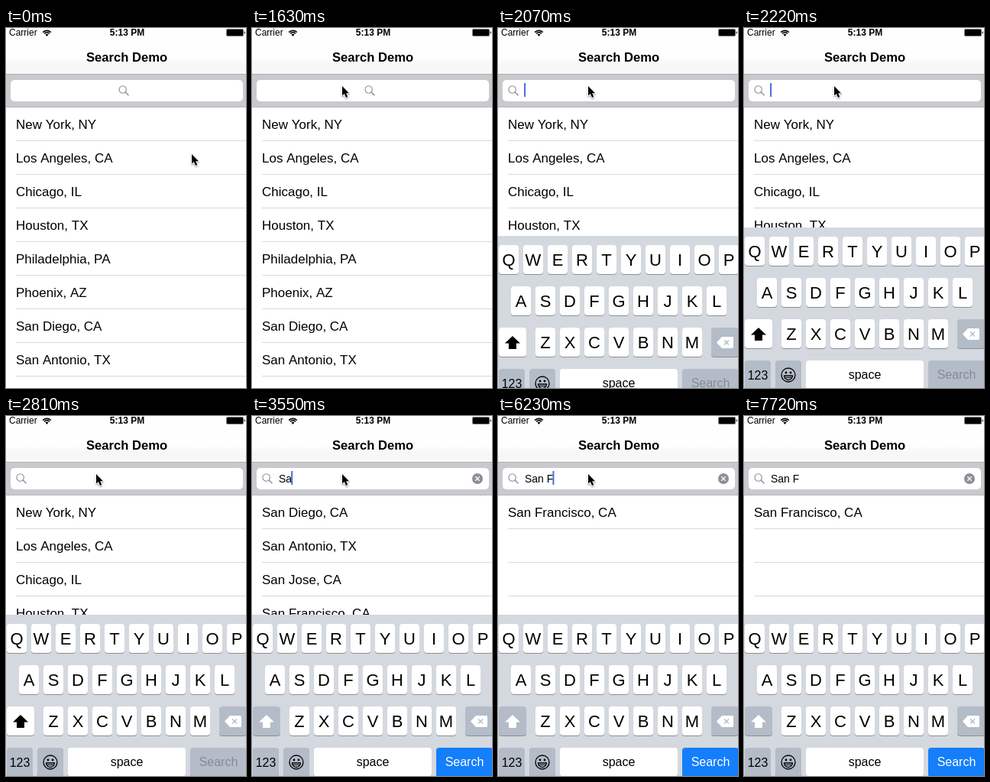
Animation, 314 px wide and 471 px high, one loop 8020 ms. Source, as an HTML page with a canvas:

```html
<!DOCTYPE html>
<html lang="en">
<head>
<meta charset="utf-8">
<title>Search Demo</title>
<style>
  html, body { margin: 0; width: 100%; height: 100%; overflow: hidden; background: #fff; }
  canvas { display: block; }
</style>
</head>
<body>
<canvas id="stage" width="314" height="471"></canvas>
<script>
const ctx = document.getElementById('stage').getContext('2d');
const W = 314, H = 471, LOOP = 8020;
const SANS = '"Liberation Sans", Arial, sans-serif';
const KEY_GRAY = '#b4bcc8';

const CITIES = [
  'New York, NY', 'Los Angeles, CA', 'Chicago, IL', 'Houston, TX',
  'Philadelphia, PA', 'Phoenix, AZ', 'San Diego, CA', 'San Antonio, TX',
  'Dallas, TX', 'San Jose, CA', 'San Francisco, CA'
];

// [start time, value] pairs
const QUERY = [[0, ''], [3260, 'S'], [3550, 'Sa'], [4000, 'San'], [4590, 'San '], [5030, 'San F']];
const CARET = [
  [0, 0], [2070, 1], [2670, .5], [2810, 0], [3110, .5], [3260, 1],
  [5630, .5], [5780, 0], [6080, .5], [6230, 1], [6680, .5], [6830, 0],
  [7120, .5], [7270, 1], [7720, 0]
];

const valueAt = (track, t) => track.filter(([start]) => start <= t).pop()[1];

// Steps taken so far, the first at `from` and the last at `to`, on a 10 ms clock
function stepsTaken(t, from, to, count) {
  if (t < from) return 0;
  const interval = Math.floor((to - from) / (count - 1) / 10) * 10;
  return Math.min(count, 1 + Math.floor((t - from) / interval));
}

const mix = (a, b, p) => a + (b - a) * p;
const smooth = p => p * p * (3 - 2 * p);

// Remaining share of a critically damped slide
function slideLeft(t) {
  const n = stepsTaken(t, 1930, 2370, 4);
  if (!n) return 1;
  const u = 18.26 * (.107 + (n - 1) * .147);
  return (1 + u) * Math.exp(-u);
}

function rect(x, y, w, h, color) {
  ctx.fillStyle = color;
  ctx.fillRect(x, y, w, h);
}

function roundRect(x, y, w, h, r, color) {
  ctx.fillStyle = color;
  ctx.beginPath();
  ctx.roundRect(x, y, w, h, r);
  ctx.fill();
}

function text(str, x, y, size, { color = '#000', align = 'left', weight = '' } = {}) {
  ctx.font = `${weight} ${size}px ${SANS}`;
  ctx.textAlign = align;
  ctx.fillStyle = color;
  ctx.fillText(str, x, y);
}

function polygon(points, color) {
  ctx.beginPath();
  points.forEach(([x, y]) => ctx.lineTo(x, y));
  ctx.closePath();
  ctx.fillStyle = color;
  ctx.fill();
}

function line(x1, y1, x2, y2, color, width) {
  ctx.beginPath();
  ctx.moveTo(x1, y1);
  ctx.lineTo(x2, y2);
  ctx.strokeStyle = color;
  ctx.lineWidth = width;
  ctx.stroke();
}

function cross(x, y, r, color, width) {
  line(x - r, y - r, x + r, y + r, color, width);
  line(x + r, y - r, x - r, y + r, color, width);
}

function disc(x, y, r, color) {
  ctx.beginPath();
  ctx.arc(x, y, r, 0, Math.PI * 2);
  ctx.fillStyle = color;
  ctx.fill();
}

function drawHeader() {
  const shade = ctx.createLinearGradient(0, 38, 0, 48);
  shade.addColorStop(0, '#fefefe');
  shade.addColorStop(1, '#f7f7f7');
  rect(0, 0, W, 60, shade);
  rect(0, 60, W, 1, '#adadb1');

  text('Carrier', 4, 10, 12);
  ctx.strokeStyle = '#000';
  ctx.lineWidth = 1.7;
  for (const r of [7.2, 4.6]) {
    ctx.beginPath();
    ctx.arc(53.5, 10.5, r, -Math.PI * .76, -Math.PI * .24);
    ctx.stroke();
  }
  polygon([[53.5, 11], [51.5, 8.6], [53.5, 7.6], [55.5, 8.6]], '#000');
  text('5:13 PM', 158.5, 10, 12, { align: 'center', weight: 'bold' });
  roundRect(288, 1, 23, 10, 2, '#777');
  roundRect(289, 2, 21, 8, 1, '#000');
  roundRect(311.5, 4.5, 1.5, 3, .7, '#555');
  text('Search Demo', 158, 44, 16.6, { align: 'center', weight: 'bold' });
}

function drawSearchBar(query, caret, iconShift) {
  rect(0, 61, W, 43, '#c9c9ce');
  rect(0, 103, W, 1, '#b9b9be');
  roundRect(6, 68, 304, 28, 5, '#fff');

  const x = 13 + iconShift;
  ctx.beginPath();
  ctx.arc(x + 5.7, 80.5, 4.7, 0, Math.PI * 2);
  ctx.strokeStyle = '#8e8e93';
  ctx.lineWidth = 1.1;
  ctx.stroke();
  line(x + 9, 83.8, x + 13.5, 88.3, '#8e8e93', 1.4);

  text(query, 35, 87, 14);
  if (query) {
    disc(295, 82, 7, '#8e8e93');
    cross(295, 82, 2.7, '#fff', 1.3);
  }
  if (caret) {
    ctx.font = `14px ${SANS}`;
    ctx.globalAlpha = caret;
    rect(34.1 + ctx.measureText(query).width, 72, 2, 18, '#4a6be0');
    ctx.globalAlpha = 1;
  }
}

function drawList(query) {
  const needle = query.toLowerCase();
  CITIES.filter(city => city.toLowerCase().includes(needle))
    .forEach((city, i) => text(city, 13, 132 + i * 44, 17));
  for (let y = 147; y < H; y += 44) rect(13, y, W - 13, 1, '#d9d9dc');
}

function key(x, y, w, color = '#fff') {
  roundRect(x, y + 1, w, 38, 4, '#8b8f95');
  roundRect(x, y, w, 38, 4, color);
}

function drawKeyboard(typed) {
  rect(0, 260, W, 220, '#d4d8df');
  [['QWERTYUIOP', 1], ['ASDFGHJKL', 17], ['ZXCVBNM', 49]].forEach(([letters, left], row) => {
    [...letters].forEach((letter, i) => {
      const x = left + i * 32, y = 272 + row * 54;
      key(x, y, 26);
      text(letter, x + 13, y + 27, 22, { align: 'center' });
    });
  });

  key(1, 380, 36, typed ? KEY_GRAY : '#fff');
  polygon([[19, 391], [29, 400.5], [24, 400.5], [24, 408], [14, 408], [14, 400.5], [9, 400.5]],
    typed ? '#fff' : '#000');

  key(279, 380, 36, KEY_GRAY);
  polygon([[286, 399.5], [293, 392], [307, 392], [308, 393], [308, 406], [307, 407], [293, 407]], '#fff');
  cross(299, 399.5, 3, KEY_GRAY, 1.4);

  key(1, 434, 34, KEY_GRAY);
  text('123', 18, 459, 16, { align: 'center' });
  key(41, 434, 34, KEY_GRAY);
  drawSmiley(58, 453);
  key(81, 434, 154);
  text('space', 158, 458, 16, { align: 'center' });
  key(241, 434, 74, typed ? '#147efb' : KEY_GRAY);
  text('Search', 278, 458, 16, { align: 'center', color: typed ? '#fff' : '#868c96' });
}

function drawSmiley(x, y) {
  ctx.beginPath();
  ctx.arc(x, y, 9, 0, Math.PI * 2);
  ctx.strokeStyle = '#000';
  ctx.lineWidth = 1.3;
  ctx.stroke();
  disc(x - 3, y - 3, 1.4, '#000');
  disc(x + 3, y - 3, 1.4, '#000');
  ctx.beginPath();
  ctx.arc(x, y + 1, 5.5, 0, Math.PI);
  ctx.closePath();
  ctx.stroke();
  line(x - 4.5, y + 3.4, x + 4.5, y + 3.4, '#000', 1);
}

function drawPointer(t) {
  if (t >= 7720) return;
  const approach = smooth(stepsTaken(t, 600, 1630, 8) / 8);
  const leave = stepsTaken(t, 7420, 7570, 2) / 2;
  const x = mix(mix(243, 118, approach), 217, leave);
  const y = mix(mix(165, 76, approach), 237, leave);
  ctx.save();
  ctx.translate(Math.round(x), Math.round(y));
  ctx.lineJoin = 'round';
  ctx.shadowColor = 'rgba(0,0,0,.35)';
  ctx.shadowBlur = 2;
  ctx.shadowOffsetY = 1;
  polygon([[0, 0], [0, 12.5], [2.8, 10], [5, 15], [7.3, 14], [5.2, 9.2], [9, 9.2]], '#000');
  ctx.strokeStyle = '#fff';
  ctx.lineWidth = 2;
  ctx.stroke();
  ctx.shadowColor = 'transparent';
  ctx.fill();
  ctx.restore();
}

function draw(t) {
  const query = valueAt(QUERY, t);
  const left = slideLeft(t);
  rect(0, 0, W, H, '#fff');
  drawList(query);
  drawHeader();
  drawSearchBar(query, valueAt(CARET, t), Math.round(134 * left * left));
  if (left < 1) {
    ctx.save();
    ctx.translate(0, Math.round(211 * left));
    drawKeyboard(query !== '');
    ctx.restore();
  }
  drawPointer(t);
}

const started = performance.now();
function tick() {
  draw((performance.now() - started) % LOOP);
  requestAnimationFrame(tick);
}
tick();
</script>
</body>
</html>
```
